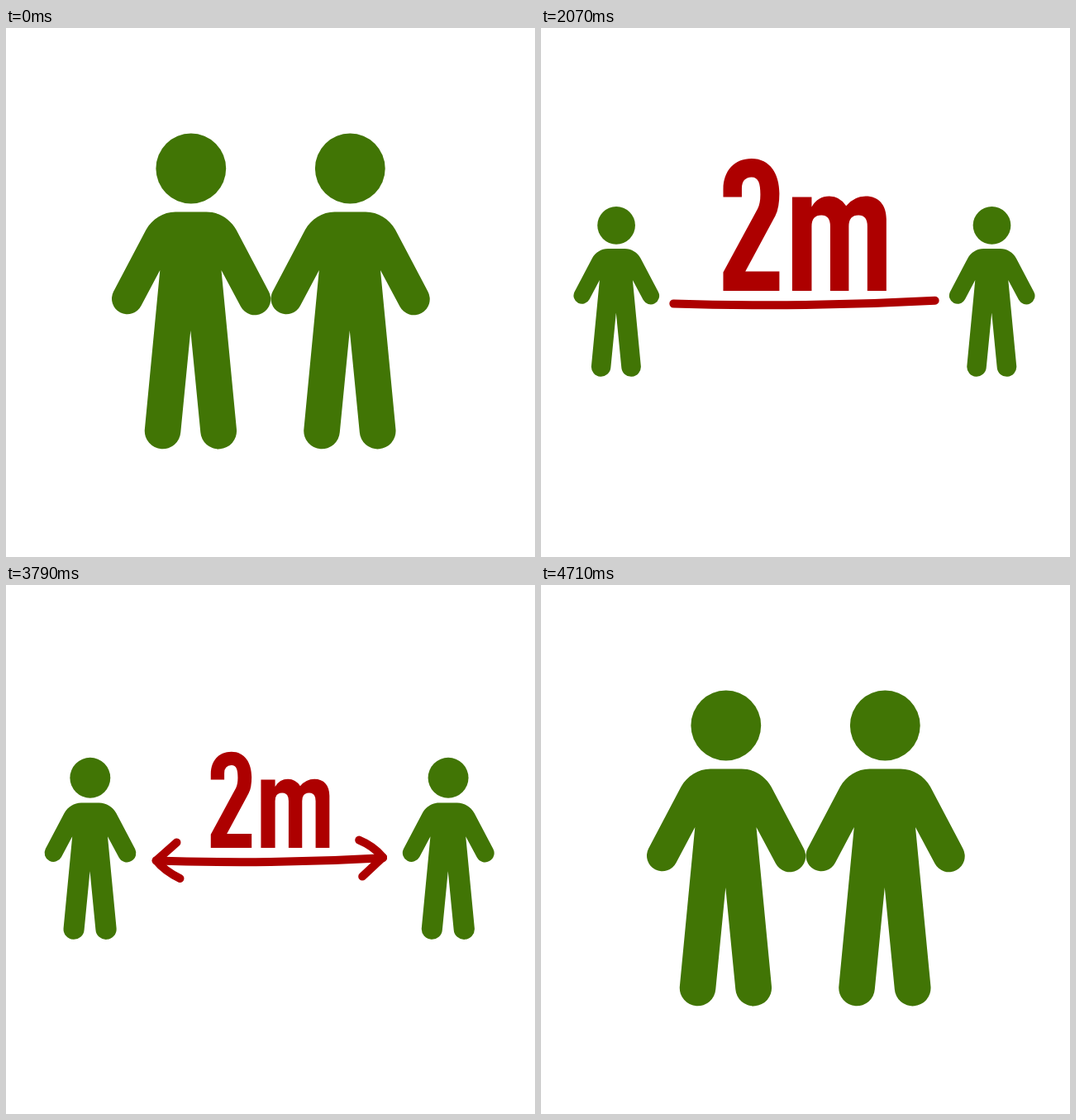
Animation, 640 px wide and 640 px high, one loop 4.78 s. Source, as an HTML page:

```html
<!DOCTYPE html>
<html lang="en">
<head>
<meta charset="utf-8">
<title>Keep your distance</title>
<style>
  html, body { margin: 0; height: 100%; overflow: hidden; background: #fff; }
  svg { display: block; width: 100vw; height: 100vh; }
  #arrow { fill: none; stroke: #ad0000; stroke-linecap: round; stroke-linejoin: round; }
  #label { fill: #ad0000; }
</style>
</head>
<body>
<svg viewBox="0 0 640 640">
  <defs>
    <g id="person" fill="#417505">
      <circle cx="223.8" cy="170" r="42.4"/>
      <path d="M205 222.5H242.5C258 222.5 271 231 278.5 244L318 319
        A18.7 18.7 0 0 1 284 337L260.5 293L279 486A21.7 21.7 0 0 1 235.3 489
        L223.3 366L211.3 489A21.7 21.7 0 0 1 167.8 486L186.3 293L163.5 336
        A18.7 18.7 0 0 1 130 319L169.5 244C177 231 190 222.5 205 222.5Z"/>
    </g>
  </defs>
  <use id="left" href="#person"/>
  <use id="right" href="#person"/>
  <g id="arrow">
    <path class="shaft" pathLength="1" d="M320 335Q230 336 147 333"/>
    <path class="shaft" pathLength="1" d="M320 335Q405 334 490 329"/>
    <g id="heads">
      <path pathLength="1" d="M147 333L178 305.5"/>
      <path pathLength="1" d="M147 333Q160 349 183 360"/>
      <path pathLength="1" d="M490 328Q476 311 454 302"/>
      <path pathLength="1" d="M490 328L459 357"/>
    </g>
  </g>
  <!-- Condensed poster lettering -->
  <g id="label" role="img" aria-label="2m">
    <path d="M227 318V297L266 225Q269 219 269 209C269 197 267 189.500 259 189.500Q248 190 248 202V212H227V203
      C227 182 240 168.500 259 168.500C280 168.500 290.500 186 290.500 208Q290.500 224 286 233L252 296H290.500V318Z"/>
    <path d="M305 318V212H327V223Q334 211 347 211Q359 211 366 222Q375 211 388 211C403 211 411.500 221 411.500 237V318
      H390V245Q390 232.500 380 232.500Q369 232.500 369 245V318H348V245Q348 232.500 338 232.500Q327 232.500 327 245V318Z"/>
  </g>
</svg>
<script>
const LOOP = 4780;
const $ = id => document.getElementById(id);
const shafts = document.querySelectorAll('.shaft');
const strokes = document.querySelectorAll('#heads path');

const clamp = x => Math.min(1, Math.max(0, x));
const span = (t, start, length) => clamp((t - start) / length);
const inOut = x => x < 0.5 ? 4 * x ** 3 : 1 - 4 * (1 - x) ** 3;
const out = x => 1 - (1 - x) ** 3;

const scaleAbout = (el, x, y, k, dx = 0) => el.setAttribute('transform',
  `translate(${x + dx} ${y}) scale(${k}) translate(${-x} ${-y})`);
const show = (el, on) => el.setAttribute('visibility', on ? 'visible' : 'hidden');
const trim = (paths, amount) => paths.forEach(p =>
  p.setAttribute('stroke-dasharray', amount < 1 ? `${amount} 2` : 'none'));

function draw(t) {
  // Figures step apart and back
  const apart = inOut(span(t, 1180, 1220)) - inOut(span(t, 3380, 1220));
  const size = 1 - apart / 2;
  scaleAbout($('left'), 223.8, 319.3, size, -144 * apart);
  scaleAbout($('right'), 223.8, 319.3, size, 192.5 + 140.2 * apart);

  // Arrow draws itself from the middle, then shrinks at constant line width
  const shrink = 1 - inOut(span(t, 3380, 1115));
  const visible = t > 1190 && shrink > 0.001;
  show($('arrow'), visible);
  show($('heads'), visible && t > 2200);
  trim(shafts, inOut(span(t, 1180, 1220)));
  trim(strokes, out(span(t, 2200, 200)));
  scaleAbout($('arrow'), 320.2, 335, Math.max(shrink, 0.001));
  $('arrow').setAttribute('stroke-width', 10 / Math.max(shrink, 0.001));

  // Label pops up past its size and settles
  const pop = 1.07 * inOut(span(t, 1495, 600)) - 0.097 * out(span(t, 2090, 1000));
  scaleAbout($('label'), 320.6, 318, Math.max(0, pop * shrink));
}

const began = performance.now();
function tick() {
  draw((performance.now() - began) % LOOP);
  requestAnimationFrame(tick);
}
tick();
</script>
</body>
</html>
```
